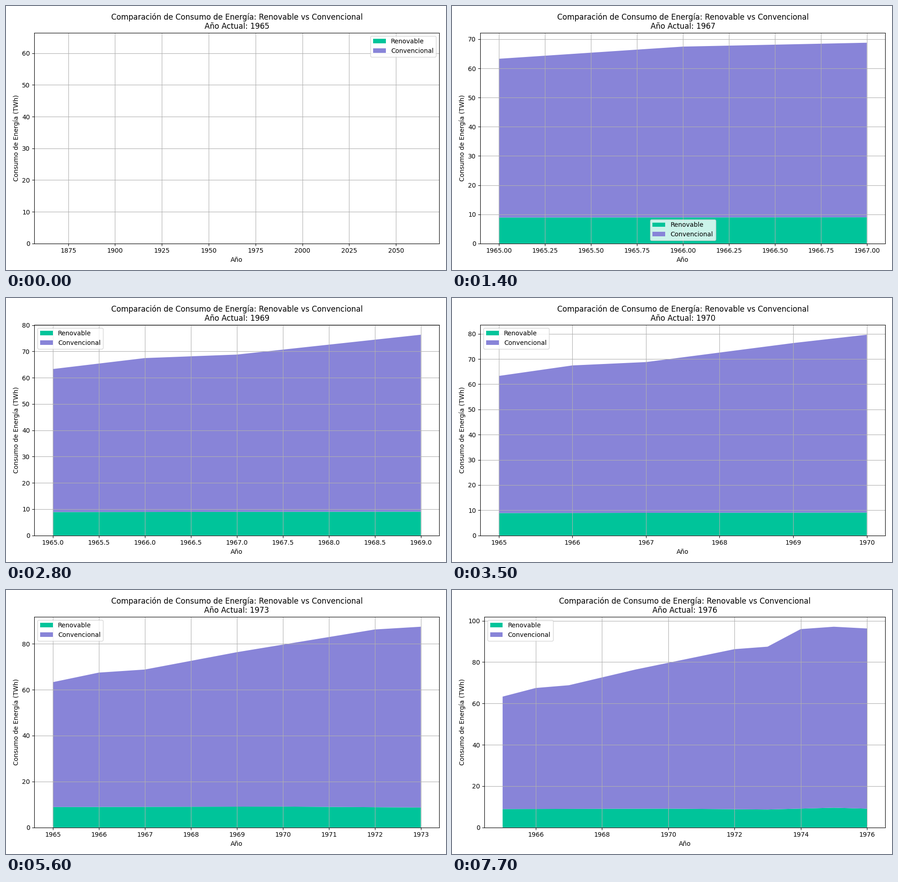
Animation of 966x580 px, one loop 8 s. Source, as a matplotlib script:

```python
import matplotlib.pyplot as plt
import numpy as np
from matplotlib.animation import FuncAnimation

W, H, DPI = 966, 580, 100
START, YEARS = 1965, 12
INTERVAL, FRAMES, HOLD = 100, 80, 7  # each year stays for HOLD frames


def trend(*points):
    """Straight segments through (years since START, TWh) turning points."""
    x, y = zip(*points)
    return np.interp(np.arange(YEARS), x, y)


years = START + np.arange(YEARS)
renewable = trend((0, 8.9), (5, 9.1), (8, 8.7), (10, 9.55), (11, 9.1))
total = trend((0, 63.3), (1, 67.47), (2, 68.8), (4, 76.35), (7, 86.25),
              (8, 87.45), (9, 95.95), (10, 97.1), (11, 96.25))

plt.rcParams["font.family"] = "DejaVu Sans"
fig, ax = plt.subplots(figsize=((W + 1e-6) / DPI, (H + 1e-6) / DPI), dpi=DPI)
shown = None


def draw_years(n):
    """Plot the first n years as stacked areas."""
    ax.clear()
    ax.stackplot(years[:n], renewable[:n], (total - renewable)[:n],
                 labels=["Renovable", "Convencional"],
                 colors=["#00C49A", "#8884D8"])
    ax.set_title("Comparación de Consumo de Energía: Renovable vs Convencional\n"
                 f"Año Actual: {years[n - 1]}")
    ax.set_xlabel("Año")
    ax.set_ylabel("Consumo de Energía (TWh)")
    ax.legend(loc="best")
    ax.grid(True)
    fig.tight_layout()


def update(frame):
    global shown
    n = frame // HOLD + 1
    if n != shown:
        draw_years(n)
        shown = n
    return []


anim = FuncAnimation(fig, update, frames=FRAMES, interval=INTERVAL,
                     repeat=True, repeat_delay=0)
plt.show()
```
